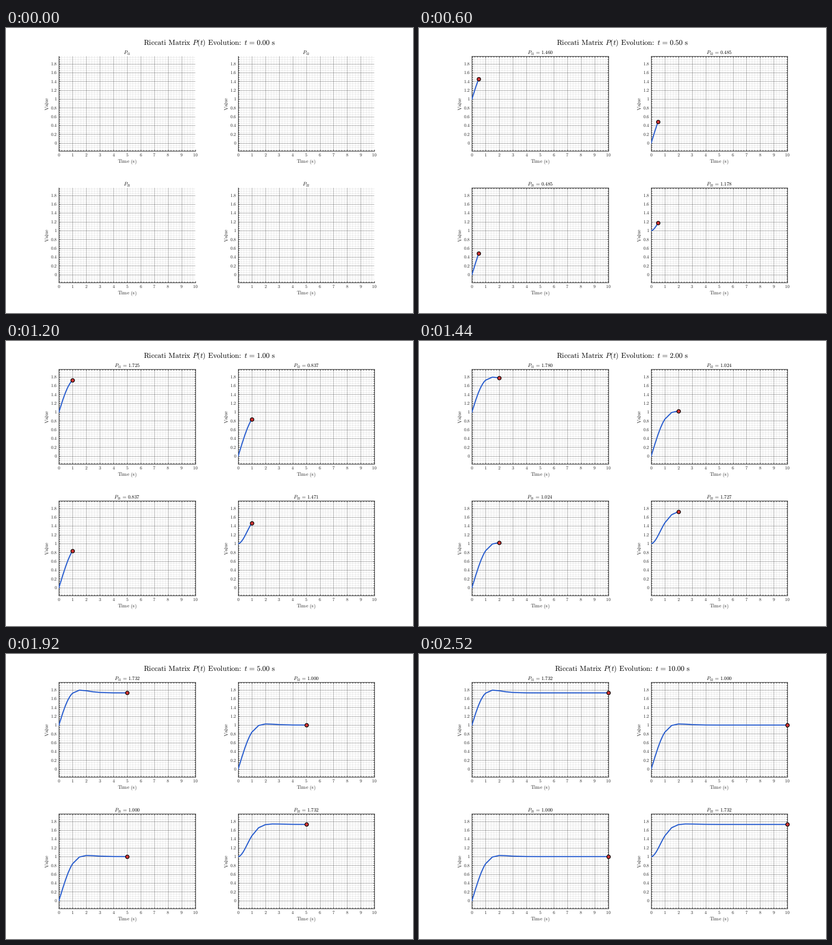
A matplotlib script that plays this animation: 894x626 px, repeating every 2640 ms.

```python
import numpy as np
import matplotlib.pyplot as plt
from matplotlib.animation import FuncAnimation

W, H, DPI = 894, 626, 64
PX = 72 / DPI  # points per pixel
INK = "#262626"
BLUE, RED = (0.18, 0.38, 0.81), (0.8, 0.2, 0.2)
SPACE = r"\hspace{0.38}"
EQUALS = r"\hspace{0.117}=\hspace{0.117}"

plt.rcParams.update({
    "mathtext.fontset": "cm",
    "text.hinting": "none",
    "toolbar": "None",
})

TIMES = np.r_[np.arange(11) / 10, 1.5, 2, 2.5, np.arange(3, 11)]


def riccati(p):
    """Double integrator with unit state and input weights."""
    p11, p12, p22 = p
    return np.array([1 - p12**2, p11 - p12 * p22, 1 + 2 * p12 - p22**2])


def solve(times, dt=0.01):
    p, rows = np.array([1.0, 0.0, 1.0]), []
    wanted = set(np.rint(times / dt).astype(int))
    for step in range(max(wanted) + 1):
        if step in wanted:
            rows.append(p)
        k1 = riccati(p)
        k2 = riccati(p + dt / 2 * k1)
        k3 = riccati(p + dt / 2 * k2)
        k4 = riccati(p + dt * k3)
        p = p + dt / 6 * (k1 + 2 * k2 + 2 * k3 + k4)
    return np.array(rows).T


P11, P12, P22 = solve(TIMES)
MARGIN = 0.1 * P11.max()
Y_LOW, Y_HIGH = -MARGIN, P11.max() + MARGIN

fig = plt.figure(figsize=(W / DPI, H / DPI), dpi=DPI, facecolor="white")


def label(x, y, text, size, color=INK, ha="center", **kw):
    """Text with its baseline at pixel (x, y), measured from the top left."""
    return fig.text(x / W, 1 - y / H, text, fontsize=size * PX, color=color,
                    ha=ha, va="baseline", **kw)


def roman(text):
    return r"\mathrm{" + text.replace(" ", SPACE) + "}"


def heading(t):
    return ("$" + roman("Riccati Matrix ") + "P(t)" + roman(" Evolution")
            + r"\hspace{-0.2}:\hspace{-0.2}\hspace{0.5}t" + EQUALS
            + f"{t:.2f}" + roman(" s") + "$")


class Panel:
    WIDTH, HEIGHT = 299.2, 207.9

    def __init__(self, name, values, left, bottom):
        self.name, self.values = name, values
        mid = left + self.WIDTH / 2
        top = bottom - self.HEIGHT
        self.ax = ax = fig.add_axes([left / W, 1 - bottom / H,
                                     self.WIDTH / W, self.HEIGHT / H])
        ax.set(xlim=(0, 10), ylim=(Y_LOW, Y_HIGH))
        ax.set_axisbelow(True)
        ax.patch.set_visible(False)

        x_ticks, y_ticks = np.arange(11), np.arange(10) * 0.2
        ax.set_xticks(x_ticks)
        ax.set_yticks(y_ticks)
        ax.set_xticks(np.arange(51) * 0.2, minor=True)
        ax.set_yticks(np.arange(-3, 40) * 0.05, minor=True)
        for which, length in (("major", 3), ("minor", 1.9)):
            ax.tick_params(which=which, direction="in", length=length * PX,
                           width=1.2 * PX, color=INK,
                           labelleft=False, labelbottom=False)
        ax.grid(which="major", color=INK, alpha=0.42, lw=PX)
        ax.grid(which="minor", color=INK, alpha=0.27, lw=PX,
                linestyle=(0, (1, 2)))
        for spine in ax.spines.values():
            spine.set(color=INK, linewidth=1.3 * PX)

        for x in x_ticks:
            label(left + x * self.WIDTH / 10, bottom + 12, f"${x}$", 10)
        for y in y_ticks:
            row = bottom - (y - Y_LOW) / (Y_HIGH - Y_LOW) * self.HEIGHT
            label(left - 3.7, row + 3.1, f"${y:.3g}$", 10, ha="right")
        label(mid, bottom + 26, "$" + roman("Time (s)") + "$", 11)
        label(left - 22.5, bottom - self.HEIGHT / 2, "$" + roman("Value") + "$",
              11, rotation=90, rotation_mode="anchor")
        self.title = label(mid, top - 5, "", 11, "black")

        self.line, = ax.plot([], [], color=BLUE, lw=2.5 * PX, zorder=3)
        self.dot, = ax.plot([], [], "o", ms=8 * PX, mfc=RED, mec="black",
                            mew=1.4 * PX, zorder=4, clip_on=False)

    def update(self, i):
        started = i > 0
        for side in ("top", "right"):
            self.ax.spines[side].set_visible(started)
        self.ax.tick_params(which="both", top=started, right=started)
        value = f"{EQUALS}{self.values[i]:.3f}" if started else ""
        self.title.set_text(f"$P_{{{self.name}}}{value}$")
        shown = slice(0, i + 1 if started else 0)
        self.line.set_data(TIMES[shown], self.values[shown])
        self.dot.set_data(TIMES[shown][-1:], self.values[shown][-1:])


LEFT, RIGHT, UPPER, LOWER = 116.3, 510.0, 270.0, 558.9
panels = [
    Panel("11", P11, LEFT, UPPER),
    Panel("12", P12, RIGHT, UPPER),
    Panel("21", P12, LEFT, LOWER),
    Panel("22", P22, RIGHT, LOWER),
]
main_title = label(W / 2, 37, "", 16, "black")


def draw(i):
    main_title.set_text(heading(TIMES[i]))
    for panel in panels:
        panel.update(i)
    return []


animation = FuncAnimation(fig, draw, frames=len(TIMES), interval=120,
                          repeat=True, repeat_delay=0, blit=False)
plt.show()
```
